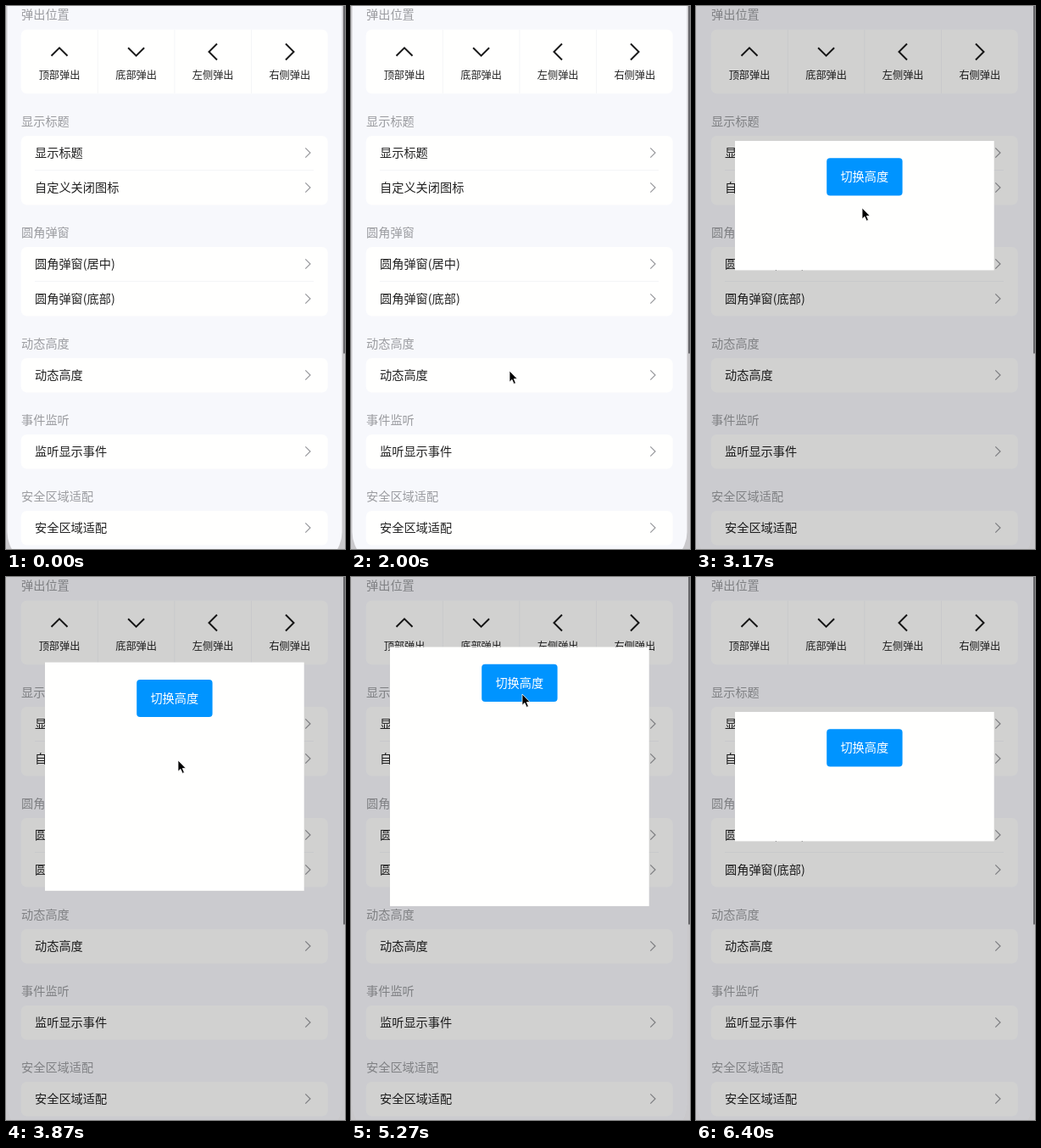
An HTML page for the animation above (7.97 s loop, 400 by 640 pixels).

```html
<!DOCTYPE html>
<html lang="zh">
<head>
<meta charset="utf-8">
<style>
  html, body { margin: 0; width: 100%; height: 100%; overflow: hidden; background: #c9c8cb; }
  svg { display: block; width: 400px; height: 640px; }
  text { font: 14.2px "Noto Sans CJK SC", "Noto Sans CJK", "Noto Sans", sans-serif; fill: #222; }
  .heading { fill: #9b9ca0; }
  .small { font-size: 12.2px; text-anchor: middle; }
  .card { fill: #fffffe; }
  .divider { stroke: #f4f5f7; }
  .icon { fill: none; stroke: #1a1a1a; stroke-width: 2; }
  .chevron { fill: none; stroke: #97989c; stroke-width: 1.2; }
  #buttonText { fill: #fff; text-anchor: middle; }
</style>
</head>
<body>
<svg viewBox="0 0 400 640">
  <rect x="398" width="2" height="409.5" fill="#66666a"/>
  <rect x="1.5" y="-60" width="395" height="720" rx="40" fill="#f7f8fc"/>
  <g id="page"></g>
  <rect id="overlay" x="1.5" y="-60" width="395" height="720" rx="40"/>
  <g id="dialog">
    <rect id="panel" x="46" width="305.7" fill="#fffffe"/>
    <g id="button">
      <rect x="154.2" y="20.3" width="89.4" height="44.2" rx="4" fill="#0094ff"/>
      <rect id="press" x="154.2" y="20.3" width="89.4" height="44.2" rx="4" opacity=".1"/>
      <text id="buttonText" x="198.8" y="47.1">切换高度</text>
    </g>
  </g>
  <path id="cursor" d="M0 0V13.2L3 10.4L5.2 15.4L7.4 14.4L5.3 9.6H9.3Z"
    stroke="#fff" stroke-width=".8" stroke-linejoin="round"/>
</svg>
<script>
const LOOP = 7970;
const $ = id => document.getElementById(id);
const clamp = v => Math.min(1, Math.max(0, v));
const mix = (a, b, p) => a + (b - a) * p;

// Page content
const label = (x, y, text, cls = '') => `<text class="${cls}" x="${x}" y="${y + 4.8}">${text}</text>`;
const card = (y, h) => `<rect class="card" x="17.7" y="${y}" width="362" height="${h}" rx="7"/>`;
const line = (x1, y1, x2, y2) => `<path class="divider" d="M${x1} ${y1}L${x2} ${y2}"/>`;

const directions = [['顶部弹出', 0], ['底部弹出', 180], ['左侧弹出', -90], ['右侧弹出', 90]];
const sections = [
  [136, '显示标题', ['显示标题', '自定义关闭图标']],
  [267, '圆角弹窗', ['圆角弹窗(居中)', '圆角弹窗(底部)']],
  [398, '动态高度', ['动态高度']],
  [488, '事件监听', ['监听显示事件']],
  [578, '安全区域适配', ['安全区域适配']]
];

let page = label(18, 10.5, '弹出位置', 'heading') + card(27.7, 75.5);
directions.forEach(([text, angle], i) => {
  const x = 63 + i * 90.6;
  page += `<path class="icon" transform="translate(${x} 54) rotate(${angle})" d="M-9.5 4.8L0 -4.7L9.5 4.8"/>`;
  page += label(x, 81, text, 'small');
  if (i) page += line(x - 45.3, 28, x - 45.3, 103);
});
for (const [y, title, rows] of sections) {
  page += label(18, y, title, 'heading') + card(y + 17, rows.length * 41 - .5);
  rows.forEach((text, i) => {
    const rowY = y + 37 + i * 41;
    page += label(34, rowY, text);
    page += `<path class="chevron" d="M353.3 ${rowY - 5.7}l5.7 5.7l-5.7 5.7"/>`;
    if (i) page += line(34, rowY - 20.5, 363, rowY - 20.5);
  });
}
$('page').innerHTML = page;

// CSS "ease" curve, solved by bisection
function ease(x) {
  let lo = 0, hi = 1;
  for (let i = 0; i < 20; i++) {
    const s = (lo + hi) / 2;
    const bx = .75 * s * (1 - s) ** 2 + .75 * s * s * (1 - s) + s ** 3;
    bx < x ? lo = s : hi = s;
  }
  return .3 * lo * (1 - lo) ** 2 + 3 * lo * lo * (1 - lo) + lo ** 3;
}
const transition = (t, start) => ease(clamp((t - start) / 300));

// Pointer stops: time, x, y
const stops = [
  [970, 393, 300], [1300, 245, 384], [1500, 199, 421], [1700, 187, 430],
  [2430, 187, 430], [2770, 188, 339], [3000, 191, 271], [3170, 196, 238], [3400, 203, 216],
  [4130, 203, 216], [4430, 206, 158], [4570, 206, 147], [4800, 202, 138],
  [5800, 202, 138], [6000, 236, 152], [6200, 310, 181], [6400, 386, 219]
];

function moveCursor(t) {
  const next = stops.findIndex(s => t < s[0]);
  $('cursor').style.display = next > 0 ? '' : 'none';
  if (next < 1) return;
  const [t0, x0, y0] = stops[next - 1], [t1, x1, y1] = stops[next];
  const p = (t - t0) / (t1 - t0);
  $('cursor').setAttribute('transform', `translate(${mix(x0, x1, p)} ${mix(y0, y1, p)})`);
}

function draw(t) {
  const shown = transition(t, 2170);
  $('overlay').setAttribute('opacity', .18 * shown);
  $('dialog').setAttribute('opacity', shown);

  const grown = t < 3800 ? 0 : transition(t, 3732) - transition(t, 5329);
  const height = mix(152.4, 305.4, grown), top = 235.2 - height / 2;
  $('panel').setAttribute('y', top);
  $('panel').setAttribute('height', height);
  $('button').setAttribute('transform', `translate(0 ${top})`);
  const pressed = [3600, 5230].some(s => t >= s && t < s + 30);
  $('press').style.display = pressed ? '' : 'none';
  moveCursor(t);
}

const begin = performance.now();
function tick() {
  draw((performance.now() - begin) % LOOP);
  requestAnimationFrame(tick);
}
tick();
</script>
</body>
</html>
```
